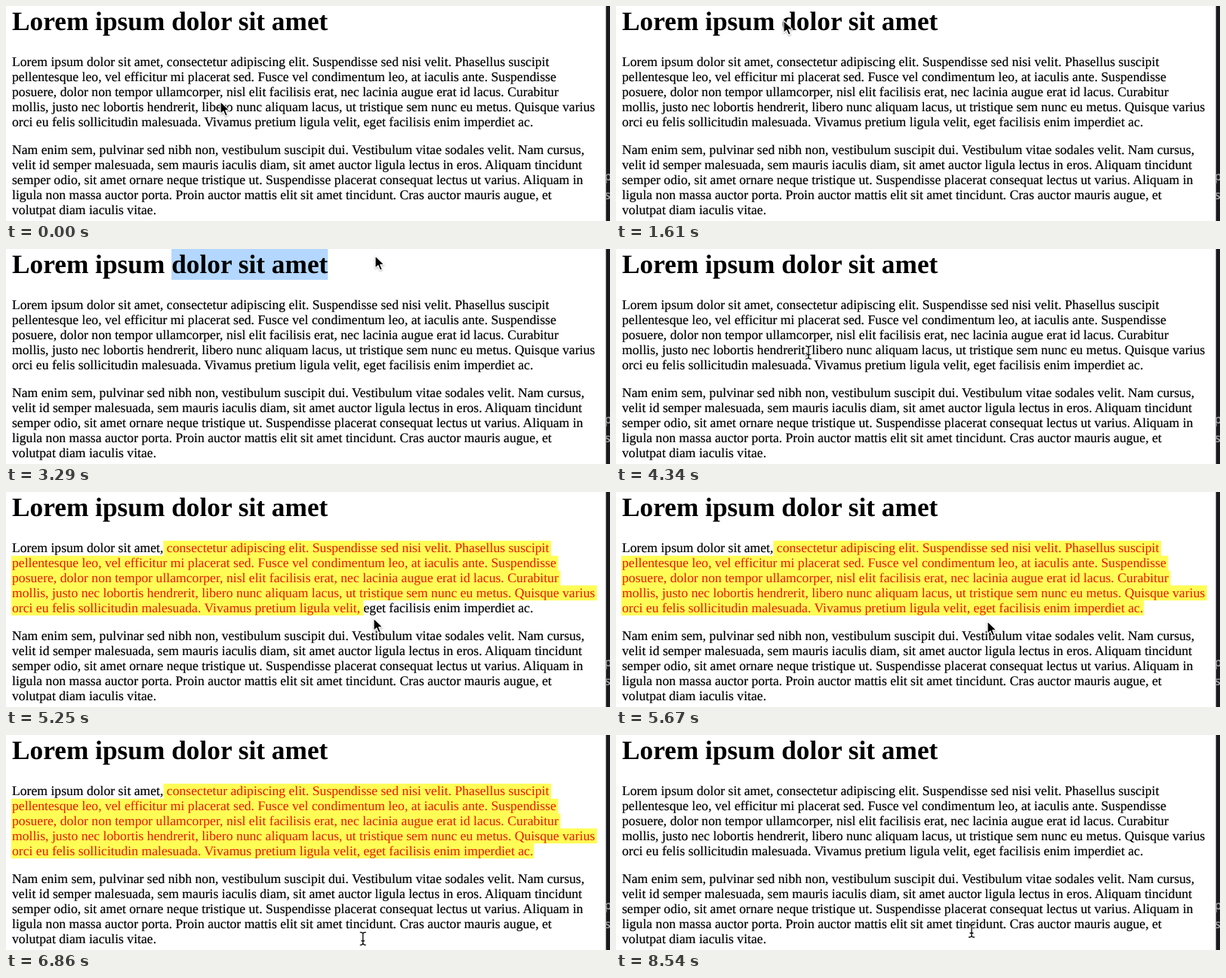
These frames come from a looping animation (800x286 px, 8610 ms). An HTML page:

```html
<!DOCTYPE html>
<html lang="en">
<head>
<meta charset="utf-8">
<title>Text selection</title>
<style>
  html, body { margin: 0; width: 100%; height: 100%; overflow: hidden; background: #fff; }
  svg { display: block; width: 100vw; height: 100vh; }
  text { font-family: "Liberation Serif", Times, serif; font-size: 17.65px; text-rendering: geometricPrecision; }
  #body text { stroke: #000; stroke-width: .2; }
  .title { font-size: 35.3px; font-weight: bold; }
  .marked text { fill: #ea1506; }
  .side text { font: 600 16px "Open Sans", sans-serif; fill: #a8a8aa; }
  #arrow { filter: drop-shadow(0 1px .8px rgba(0, 0, 0, .3)); }
</style>
</head>
<body>
<svg viewBox="0 0 800 286" xmlns="http://www.w3.org/2000/svg">
  <clipPath id="sel"></clipPath>
  <rect width="800" height="286" fill="#fff"/>
  <rect id="blue" y="0" height="41" fill="#b3d7ff"/>
  <text id="title" class="title" x="8" y="31.8">Lorem ipsum dolor sit amet</text>
  <g id="body"></g>
  <g class="marked" clip-path="url(#sel)">
    <rect width="800" height="286" fill="#fffd55"/>
    <g id="red"></g>
  </g>
  <g class="side">
    <rect x="794.6" width="6" height="286" fill="#1b1b1d"/>
    <text x="792.5" y="232">p</text>
    <text x="793" y="256.5">s</text>
  </g>
  <path id="arrow" d="M0 0V16.6L3.9 13L6.6 19.2L9.4 18L6.8 11.9H12Z" stroke="#fff" stroke-width="1.2" stroke-linejoin="round"/>
  <g id="beam" fill="none" stroke-linecap="round"></g>
</svg>
<script>
const LOOP = 8610, LEFT = 8, TOP = 64.8, PITCH = 19.85;
const $ = id => document.getElementById(id);

const first = [
  "Lorem ipsum dolor sit amet, consectetur adipiscing elit. Suspendisse sed nisi velit. Phasellus suscipit",
  "pellentesque leo, vel efficitur mi placerat sed. Fusce vel condimentum leo, at iaculis ante. Suspendisse",
  "posuere, dolor non tempor ullamcorper, nisl elit facilisis erat, nec lacinia augue erat id lacus. Curabitur",
  "mollis, justo nec lobortis hendrerit, libero nunc aliquam lacus, ut tristique sem nunc eu metus. Quisque varius",
  "orci eu felis sollicitudin malesuada. Vivamus pretium ligula velit, eget facilisis enim imperdiet ac."
];
const second = [
  "Nam enim sem, pulvinar sed nibh non, vestibulum suscipit dui. Vestibulum vitae sodales velit. Nam cursus,",
  "velit id semper malesuada, sem mauris iaculis diam, sit amet auctor ligula lectus in eros. Aliquam tincidunt",
  "semper odio, sit amet ornare neque tristique ut. Suspendisse placerat consequat lectus ut varius. Aliquam in",
  "ligula non massa auctor porta. Proin auctor mattis elit sit amet tincidunt. Cras auctor mauris augue, et",
  "volutpat diam iaculis vitae."
];

function add(parent, tag, attrs, content = "") {
  const el = document.createElementNS("http://www.w3.org/2000/svg", tag);
  for (const k in attrs) el.setAttribute(k, attrs[k]);
  el.textContent = content;
  return parent.appendChild(el);
}
const set = (el, k, v) => el.setAttribute(k, v);
const show = (el, on) => set(el, "visibility", on ? "visible" : "hidden");

const paragraph = (parent, lines, y) =>
  lines.map((s, i) => add(parent, "text", { x: LEFT, y: y + i * PITCH }, s));
const rows = paragraph($("body"), first, 80.4);
paragraph($("body"), second, 197.1);
paragraph($("red"), first, 80.4);

const bars = first.map((_, i) => add($("sel"), "rect", { y: TOP + i * PITCH, height: PITCH + .1 }));
for (const [stroke, width] of [["#fff", 2.6], ["#000", 1.3]])
  add($("beam"), "path", { d: "M-3.5-8.5Q0-8.5 0-6Q0-8.5 3.5-8.5M0-6V6M-3.5 8.5Q0 8.5 0 6Q0 8.5 3.5 8.5M-2 3H2", stroke, "stroke-width": width });

// Character edges let a selection snap as it does in a browser
const edges = el => [LEFT, ...Array.from(el.textContent, (_, i) => el.getEndPositionOfChar(i).x)];
const snap = (list, x) => list.reduce((a, b) => Math.abs(b - x) < Math.abs(a - x) ? b : a);
const titleEdges = edges($("title")), rowEdges = rows.map(edges);
const titleStart = titleEdges[12], markStart = rowEdges[0][27];
const velitEnd = rowEdges[4][first[4].indexOf("eget")];

// Keys are [time, x, y], eased between
const pointer = [
  [0, 284, 127], [140, 284, 127], [910, 224, 21.5], [1050, 222, 19.2], [1890, 222, 19.2],
  [2560, 440, 20], [2800, 486, 12], [3290, 489, 9], [3710, 489, 9], [4200, 255, 137.7],
  [4340, 255, 137.7], [4690, 210, 76], [4760, 210, 76], [5250, 487, 168],
  [5600, 492, 172], [6370, 492, 172], [6800, 473, 272], [7100, 471, 260.5], [LOOP, 471, 260.5]
];
const drag = [[4760, 210, 76], [5180, 440, 138], [5250, 473, 155], [LOOP, 473, 155]];

function at(keys, t) {
  const i = Math.max(1, keys.findIndex(k => k[0] > t));
  const [t0, x0, y0] = keys[i - 1], [t1, x1, y1] = keys[i];
  const p = Math.min(1, Math.max(0, (t - t0) / (t1 - t0))), e = p * p * (3 - 2 * p);
  return [x0 + (x1 - x0) * e, y0 + (y1 - y0) * e];
}

function markText(t) {
  const on = t >= 4760 && t < 6930;
  const [x, y] = at(drag, t);
  const last = Math.min(4, Math.floor((y - TOP) / PITCH));
  let end = snap(rowEdges[last], x);
  if (t >= 5250) end = t < 5390 ? velitEnd : rowEdges[4].at(-1) + .8;
  bars.forEach((bar, i) => {
    const from = i ? LEFT - 1 : markStart;
    const to = i < last ? rowEdges[i].at(-1) + 2.6 : end;
    set(bar, "x", from);
    set(bar, "width", on && i <= last ? Math.max(0, to - from) : 0);
  });
}

function draw(ms) {
  const t = Math.floor(ms % LOOP / 70) * 70;
  const [x, y] = at(pointer, t);

  const titleOn = t >= 1890 && t < 4130;
  const end = t >= 2560 ? titleEdges.at(-1) : snap(titleEdges, x);
  set($("blue"), "x", titleStart);
  set($("blue"), "width", titleOn ? Math.max(0, end - titleStart) : 0);
  markText(t);

  const beam = t >= 1960 && t < 2590 || t >= 3920 && t < 5250 || t >= 6510;
  const shape = beam ? $("beam") : $("arrow");
  show($("beam"), beam);
  show($("arrow"), !beam);
  set(shape, "transform", `translate(${x} ${y})`);
}

const begin = performance.now();
function tick() {
  draw(performance.now() - begin);
  requestAnimationFrame(tick);
}
tick();
</script>
</body>
</html>
```
